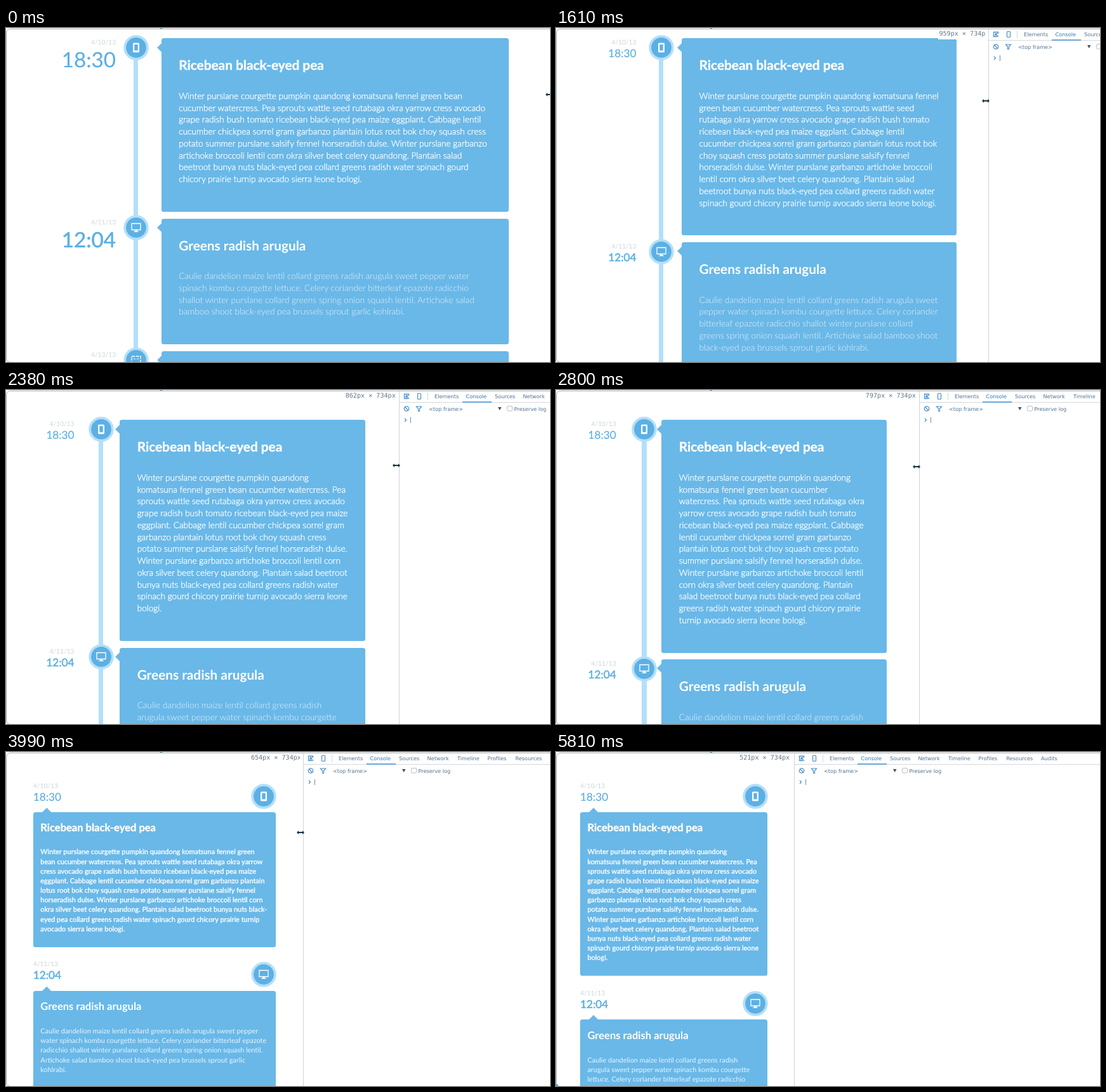
Animation of 857 by 527 pixels, one loop 5880 ms. Source, as an HTML page:

```html
<!DOCTYPE html>
<html lang="en">
<head>
<meta charset="utf-8">
<title>Responsive timeline</title>
<style>
html, body { margin: 0; width: 100%; height: 100%; overflow: hidden; background: #fff; }
#stage { position: relative; width: 857px; height: 527px; overflow: hidden; background: #fff;
  font-family: Lato, sans-serif; text-rendering: geometricPrecision; }
#stage div, #stage svg, h2, p, #stage span { position: absolute; margin: 0; }
#stage svg { overflow: visible; }
.bar { width: 7.2px; background: #b3dffa; }
.card { background: #69b8e8; border-radius: 3.6px; color: #fff; }
.arrow { width: 10.2px; height: 10.2px; background: #69b8e8; transform: rotate(45deg); }
h2 { font-weight: 700; white-space: nowrap; line-height: 30px; }
.date, .time { white-space: nowrap; line-height: 40px; }
.date { font-size: 10.3px; color: #ccd6dc; }
.time { color: #5bafe4; -webkit-text-stroke: .15px #5bafe4; }
.first p, .first h2 { -webkit-text-stroke: .35px #fff; }
.second .time { -webkit-text-stroke: .55px #5bafe4; }
.second p { opacity: .85; }
#clip { left: 0; top: 2px; height: 16px; overflow: hidden; }
#size { height: 16px; padding-left: 1px; background: #fff; color: #667788;
  font: 10.1px/15px "DejaVu Sans Mono", monospace; white-space: pre; }
#tools { top: 2px; width: 860px; height: 525px; background: #fff; border-left: 1px solid #d0d3d6;
  font: 8.2px/12px "DejaVu Sans", sans-serif; color: #4f7290; }
#tools span { white-space: nowrap; }
#tools .on { color: #2a78bd; }
#frame { left: 0; top: 1px; width: 862px; height: 525px; border: 1px solid #a9adb0; border-radius: 7px; }
#edge { left: 243px; top: 0; width: 3px; height: 1px; background: #4d93bd; }
#spot { left: 0; top: 524px; width: 3px; height: 3px; background: #5bafe4; }
</style>
</head>
<body>
<div id="stage">
  <div id="page"></div>
  <div id="clip"><div id="size"></div></div>
  <div id="tools">
    <svg width="860" height="60" fill="none" stroke="#4d8fc6">
      <path d="M0 17.5H860" stroke="#d5d8da"/>
      <path d="M99 17H145" stroke="#3f8fd4" stroke-width="1.6"/>
      <path d="M13 11.5H7.5V4.5H14.5V7M10 7L15 12M10 7V10.5M10 7H13.5" stroke-width="1.3"/>
      <rect x="28.5" y="3.5" width="5" height="9" rx="1" stroke-width="1.2"/>
      <path d="M44.5 2V14" stroke="#d5d8da"/>
      <circle cx="11" cy="27.5" r="3.7" stroke-width="1.3"/>
      <path d="M8.5 25L13.5 30" stroke-width="1.3"/>
      <path d="M26.5 24H34.5L31.5 27.5V31.5H29.5V27.5Z" stroke-width="1.2"/>
      <path d="M155 25H160.5L157.75 30Z" fill="#3b5266" stroke="none"/>
      <rect x="169.5" y="23.5" width="8" height="7.5" rx="1.5" stroke="#b9bec2"/>
      <path d="M8 43L10.5 45.5L8 48" stroke="#3f8fd4" stroke-width="1.2"/>
      <path d="M17.5 41V50" stroke="#7d8b96"/>
    </svg>
  </div>
  <svg id="cursor" width="1" height="1"><path d="M-6 0L-3 -3V-1H3V-3L6 0L3 3V1H-3V3Z" fill="#173442"/></svg>
  <div id="frame"></div><div id="edge"></div><div id="spot"></div>
</div>
<script>
const LOOP = 5880, STEP = 70, SCALE = .716;

// time, page width in CSS px, divider x, width shown in the size label
const KEYS = [
  [0, 1200, 860, 1200], [140, 1196, 855, 1192], [700, 1108, 789, 1103], [840, 1062, 756, 1058],
  [1610, 963, 681, 959], [1960, 911, 651, 906], [2380, 867, 619, 862], [2590, 842, 600, 837],
  [3150, 734, 524, 729], [3850, 676, 480, 671], [4480, 600, 427, 595], [4620, 587, 415, 583],
  [5110, 525, 376, 521], [5460, 524, 375, 521]
];

const PHONE = '<rect x="-5" y="-7.5" width="10" height="15" rx="1.5" fill="#fff"/><rect x="-2.7" y="-5" width="5.4" height="9.5" fill="#5cb0e4"/>';
const SCREEN = '<path d="M-7 -6.5H7V3.5H-7Z" fill="none" stroke="#fff" stroke-width="1.3"/><path d="M-2 4H2V6H4V7H-4V6H-2Z" fill="#fff"/>';
const MAIL = '<path d="M-7 -6H7V6H-7Z" fill="none" stroke="#fff" stroke-width="1.3" stroke-dasharray="5 1.5"/><path d="M-4 -2H-1M1 -2H4" stroke="#fff"/>';

const ITEMS = [
  { name: 'first', date: '4/10/13', time: '18:30', icon: PHONE, title: 'Ricebean black-eyed pea',
    text: 'Winter purslane courgette pumpkin quandong komatsuna fennel green bean cucumber watercress. Pea sprouts wattle seed rutabaga okra yarrow cress avocado grape radish bush tomato ricebean black-eyed pea maize eggplant. Cabbage lentil cucumber chickpea sorrel gram garbanzo plantain lotus root bok choy squash cress potato summer purslane salsify fennel horseradish dulse. Winter purslane garbanzo artichoke broccoli lentil corn okra silver beet celery quandong. Plantain salad beetroot bunya nuts black-eyed pea collard greens radish water spinach gourd chicory prairie turnip avocado sierra leone bologi.' },
  { name: 'second', date: '4/11/13', time: '12:04', icon: SCREEN, title: 'Greens radish arugula',
    text: 'Caulie dandelion maize lentil collard greens radish arugula sweet pepper water spinach kombu courgette lettuce. Celery coriander bitterleaf epazote radicchio shallot winter purslane collard greens spring onion squash lentil. Artichoke salad bamboo shoot black-eyed pea brussels sprout garlic kohlrabi.' },
  { name: 'third', date: '4/13/13', time: '05:36', icon: MAIL, title: '', text: '' }
];

const $ = id => document.getElementById(id);
const px = n => n.toFixed(2) + 'px';

function put(el, style) {
  for (const k in style) el.style[k] = typeof style[k] === 'number' ? px(style[k]) : style[k];
}

function add(parent, tag, cls, html = '') {
  const el = document.createElement(tag);
  el.className = cls;
  el.innerHTML = html;
  return parent.appendChild(el);
}

// Body type size at which a full line has the given measure
const pen = document.createElement('canvas').getContext('2d');
function typeSize(weight, measure) {
  pen.font = weight + ' 100px Lato, sans-serif';
  const line = 'cucumber watercress. Pea sprouts wattle seed rutabaga okra yarrow cress avocado';
  return 100 * measure / pen.measureText(line).width;
}
const WIDE_TYPE = typeSize(300, 485), NARROW_TYPE = typeSize(400, 395);

const bar = add($('page'), 'div', 'bar');
const rows = ITEMS.map(item => {
  const box = add($('page'), 'div', item.name);
  const row = {
    date: add(box, 'div', 'date', item.date),
    time: add(box, 'div', 'time', item.time),
    arrow: add(box, 'div', 'arrow'),
    card: add(box, 'div', 'card'),
    icon: add(box, 'div', 'icon', '<svg width="1" height="1"><circle r="17.8" fill="#5cb0e4" stroke="#b3dffa" stroke-width="3.8"/>' + item.icon + '</svg>')
  };
  row.title = add(row.card, 'h2', '', item.title);
  row.text = add(row.card, 'p', '', item.text);
  return row;
});

[['Elements', 55], ['Console', 104.5], ['Sources', 150], ['Network', 194.5], ['Timeline', 242],
 ['Profiles', 289.5], ['Resources', 333.5], ['Audits', 388], ['&lt;top frame&gt;', 46, 21.5], ['Preserve log', 180.5, 21.5]
].forEach(([label, left, top = 2]) => {
  const tab = add($('tools'), 'span', label === 'Console' ? 'on' : '', label);
  put(tab, { left, top });
});

function sample(t) {
  const i = KEYS.findIndex(k => k[0] > t);
  if (i < 0) return KEYS[KEYS.length - 1];
  const a = KEYS[i - 1], b = KEYS[i], f = (t - a[0]) / (b[0] - a[0]);
  return a.map((v, j) => v + (b[j] - v) * f);
}

function layout(width) {
  const mobile = width <= 755, large = width > 1046;
  const left = SCALE * .05 * width + 19.2, inner = SCALE * (.9 * width - 60);
  const cardX = mobile ? left : left + inner / 4;
  const cardW = left + inner - cardX;
  const axis = left + inner / 5 - 3.6;
  const pad = mobile ? 11.5 : 27.5, lead = mobile ? 15.17 : 18.75;
  const first = mobile ? 95.4 : width < 900 ? 47.3 : 16.3;
  const side = mobile ? { left, right: 'auto' } : { left: 'auto', right: -(cardX - 71.6) };
  let y = first;

  put(bar, { left: axis - 3.6, top: first, height: 600, display: mobile ? 'none' : 'block' });
  rows.forEach((r, i) => {
    const shift = mobile && i === 1 ? 1.3 : 0;
    put(r.title, { left: pad, top: (mobile ? 23.4 : 43) - 15 + shift, fontSize: mobile ? 16.55 : 20.8 });
    put(r.text, {
      left: pad, top: (mobile ? 55 : 81.6) + shift, width: cardW - 2 * pad + .5,
      fontSize: mobile ? NARROW_TYPE : WIDE_TYPE, lineHeight: lead, fontWeight: mobile ? '400' : '300'
    });
    const lines = Math.round(r.text.offsetHeight / lead);
    const height = (mobile ? 75.6 : 123.5) + lines * lead + 2 * shift;
    put(r.card, { left: cardX, top: y, width: cardW, height });
    put(r.arrow, mobile ? { left: left + 16.4, top: y - 5.1 } : { left: cardX - 5.1, top: y + 9.2 });
    put(r.icon, mobile ? { left: left + inner - 18.6, top: y - 25.7 } : { left: axis, top: y + 14.6 });
    put(r.date, { ...side, top: y - 20 + (mobile ? -41.4 : 6.7) });
    put(r.time, {
      ...side, top: y - 20 + (mobile ? -24.4 : large ? 33.5 : 23.5),
      fontSize: large ? 33.2 : 17.2
    });
    y += height + (mobile ? 69.2 : 10.7);
  });
}

function draw(t) {
  const [, width, divider, shown] = sample(t);
  layout(width);
  const label = Math.round(shown) + 'px × 734px';
  $('size').textContent = label;
  put($('size'), { left: SCALE * width - 8 - label.length * 6.08 });
  put($('clip'), { width: divider - 5, display: t ? 'block' : 'none' });
  put($('tools'), { left: Math.round(divider) });
  put($('cursor'), {
    left: divider - 4, top: 105.5 + .056 * (857 - divider), display: t < 5460 ? 'block' : 'none'
  });
  put($('spot'), { display: t >= 5670 ? 'block' : 'none' });
}

let last = -1;
function tick() {
  const beat = Math.floor(performance.now() % LOOP / STEP) * STEP;
  const t = beat < 140 ? 0 : beat;
  if (t !== last) draw(last = t);
  requestAnimationFrame(tick);
}
tick();
</script>
</body>
</html>
```
